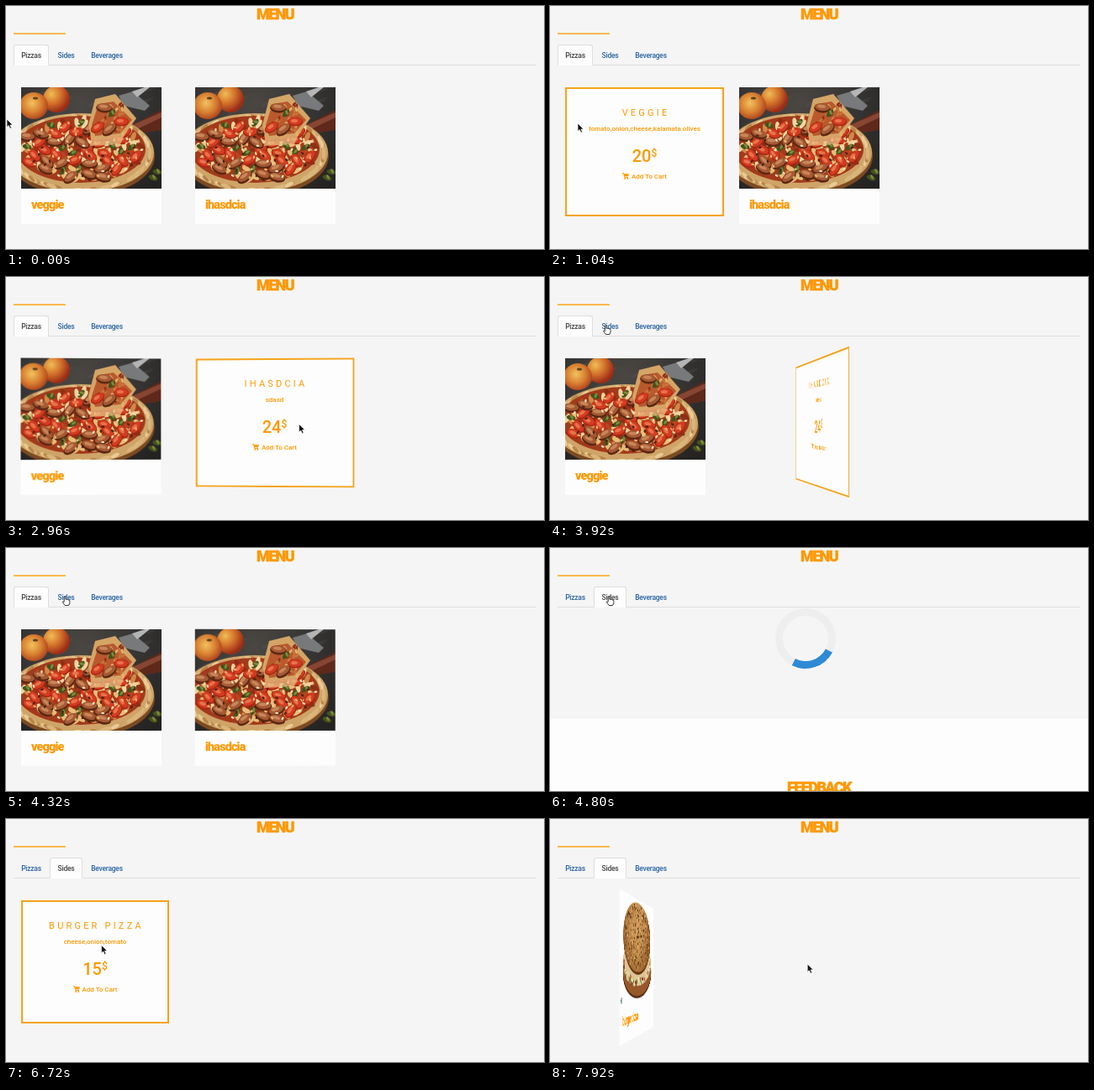
Write an HTML page with a canvas that moves like this. It is 640x290 px and loops after 8 s.

```html
<!DOCTYPE html>
<html lang="en">
<head>
<meta charset="utf-8">
<title>Menu</title>
<style>
html, body { margin: 0; width: 100%; height: 100%; overflow: hidden; }
#stage { position: relative; width: 640px; height: 290px; overflow: hidden; background: #fdfdfd; font: 500 8px/10px Roboto, sans-serif; color: #ff9800; }
#stage * { box-sizing: border-box; }
#stage > *, .face, .face > * { position: absolute; }
#panel { left: 0; top: 0; width: 640px; background: #f5f5f5; }
.brush { font-weight: 900; letter-spacing: -.9px; white-space: nowrap; }
h2 { margin: 0; width: 640px; text-align: center; font-size: 18px; line-height: 20px; }
h2.brush { letter-spacing: -1.6px; -webkit-text-stroke: .4px; }
#rule { left: 9px; top: 32px; width: 62px; height: 2px; background: #fbb750; }
#line { left: 9px; top: 70px; width: 622px; height: 1px; background: #ddd; }
.tab { top: 46px; height: 25px; padding: 7px 0; text-align: center; font-size: 8.5px; letter-spacing: -.25px; color: #2a64a3; border: 1px solid transparent; border-radius: 3px 3px 0 0; }
.tab.on { color: #444; background: #fdfdfd; border-color: #ddd #ddd #fdfdfd; }
.card { top: 97px; height: 164px; perspective: 600px; }
.flip { width: 100%; height: 100%; transform-style: preserve-3d; }
.face { left: 0; top: 0; backface-visibility: hidden; background: #fdfdfd; }
.face canvas { left: 0; top: 0; }
.name { left: 12px; font-size: 14.5px; line-height: 20px; }
.back { width: 100%; transform: rotateY(180deg); border: 2px solid #f5a31a; text-align: center; }
.back > * { left: 0; width: 100%; white-space: nowrap; }
.title { top: 22px; font: 400 11px/14px Roboto, sans-serif; letter-spacing: 3.2px; text-indent: 3px; }
.text { top: 43px; }
.price { top: 68px; font-size: 20px; line-height: 24px; }
.price sup { font-size: 12px; line-height: 0; vertical-align: 6px; }
.buy { top: 100px; }
.buy svg { width: 8px; height: 8px; margin-right: 3px; vertical-align: -1px; }
#spin { left: 268px; top: 71.5px; width: 72px; height: 72px; border: 9.6px solid #eee; border-top-color: #2f8ad6; border-radius: 50%; }
#arrow, #hand { left: 0; top: 0; overflow: visible; }
</style>
</head>
<body>
<div id="stage">
  <div id="panel"></div>
  <h2 class="brush" style="top:0">MENU</h2>
  <div id="rule"></div>
  <div id="line"></div>
  <div class="tab" style="left:9px;width:42px">Pizzas</div>
  <div class="tab" style="left:52px;width:39px">Sides</div>
  <div class="tab" style="left:92px;width:56px">Beverages</div>
  <div id="spin"></div>
  <h2 class="brush" id="feedback" style="top:276px">FEEDBACK</h2>
  <svg id="arrow" width="8" height="13"><path d="M0 0V9.6L2.2 7.6L3.8 11.2L5.5 10.4L4 7H7Z" fill="#111" stroke="#fff" stroke-width=".7"/></svg>
  <svg id="hand" width="10" height="13"><path d="M2.2 6.5V1Q3 -.4 3.9 1V4.3Q5 3.6 5.6 4.6Q6.8 4 7.3 5.2Q8.8 4.9 8.8 6.2V8.5L7.6 11.5H3.2L.2 7.6Q.2 6 2.2 7.4Z" fill="#fff" stroke="#222" stroke-width=".9"/></svg>
</div>
<script>
const $ = id => document.getElementById(id);
const LOOP = 8000, CLICK = 4480, LOADED = 5720, NAMED = 6060;

function seeded(seed) {
  return () => (seed = (seed * 16807) % 2147483647) / 2147483647;
}

function brush(c) {
  return {
    oval(x, y, rx, ry, color, turn = 0) {
      c.fillStyle = color;
      c.beginPath();
      c.ellipse(x, y, rx, ry, turn, 0, 7);
      c.fill();
    },
    poly(color, ...p) {
      c.fillStyle = color;
      c.beginPath();
      for (let i = 0; i < p.length; i += 2) c.lineTo(p[i], p[i + 1]);
      c.fill();
    },
    // light spot at x, y fading outwards
    glow(x, y, r, ...colors) {
      const g = c.createRadialGradient(x, y, 0, x, y, r);
      colors.forEach((color, i) => g.addColorStop(i / (colors.length - 1), color));
      return g;
    }
  };
}

function drawPizza(c) {
  const { oval, poly, glow } = brush(c), rnd = seeded(41);
  const pick = list => list[Math.floor(rnd() * list.length)];
  const leaf = (x, y) => {
    oval(x, y, 5.5, 3, '#46521c', rnd() * 3);
    oval(x + 1, y - 1, 3, 1.5, '#7d8a3c', rnd() * 3);
  };
  const tomato = (x, y) => {
    const a = rnd() * 2 - 1;
    oval(x, y, 9, 5.5, '#a82412', a);
    oval(x, y - .6, 8, 4.5, '#d23c20', a);
    oval(x - 1, y - 1, 4, 2, '#e8734c', a);
  };
  const sausage = (x, y) => {
    const a = rnd() * 2 - 1;
    oval(x, y + 1, 10, 5.5, '#5c2814', a);
    oval(x, y - .4, 9, 4.3, '#a55a34', a);
    oval(x - 1, y - 1.3, 5, 2, '#c98558', a);
  };
  c.fillStyle = glow(70, 20, 130, '#4a4743', '#383634', '#242322');
  c.fillRect(0, 0, 167, 121);
  for (let i = 0; i < 30; i++) oval(rnd() * 167, rnd() * 60, 9, 2, 'rgba(130,125,120,.1)', -.5);
  // apples
  oval(42, 14, 16, 16, glow(36, 8, 22, '#f0bd55', '#d4742c', '#9c2c17'));
  oval(15, 22, 17, 16, glow(13, 19, 22, '#f2c25e', '#d98232', '#a63419'));
  oval(17, 13, 3, 1.5, '#5f4218');
  // server and wooden handle
  poly('#77797a', 116, 10, 133, 5, 153, 22, 147, 28, 122, 22);
  poly('#b4b5b5', 132, 5, 147, 0, 153, 0, 138, 12);
  poly('#5e281b', 128, 47, 167, 27, 167, 51, 140, 55);
  poly('#874533', 130, 46, 167, 30, 167, 36, 138, 50);
  // base
  oval(71, 82, 88, 48, '#7b4a22');
  oval(71, 78, 87, 47, '#cfa468');
  for (let i = 0; i < 70; i++) {
    const a = rnd() * 6.3;
    oval(71 + 82 * Math.cos(a), 78 + 44 * Math.sin(a), 5, 2, pick(['#e8cb94', '#b98448', '#dab57a']), a + 1.6);
  }
  oval(71, 74, 77, 40, '#a23a1b');
  const scatter = (n, draw) => {
    for (let i = 0; i < n; i++) {
      const a = i * 2.4, r = Math.sqrt((i + .5) / n);
      draw(71 + 71 * r * Math.cos(a), 74 + 36 * r * Math.sin(a));
    }
  };
  scatter(130, (x, y) => oval(x + rnd() * 6, y, 6, 2.8, pick(['#e6bd78', '#d08a48', '#efd5a0', '#b8451f', '#8c2f16']), rnd() * 3));
  scatter(47, (x, y) => pick([sausage, tomato, tomato, leaf])(x, y));
  scatter(90, (x, y) => oval(x + rnd() * 8, y + rnd() * 4, 2, 1.2, pick(['#f4e0b4', '#e8b66c', '#4a2312']), rnd() * 3));
  // lifted slice
  poly('rgba(232,190,130,.75)', 84, 52, 126, 50, 118, 68, 82, 70);
  poly('#d5a566', 80, 45, 88, 14, 112, 8, 137, 37, 122, 58, 84, 62);
  poly('#b9592d', 84, 45, 92, 20, 110, 17, 132, 39, 118, 55, 88, 58);
  for (let i = 0; i < 40; i++) oval(90 + rnd() * 32, 20 + rnd() * 38, 3, 1.5, pick(['#e2b26a', '#c9743a', '#8f331a']), rnd() * 3);
  sausage(99, 24);
  tomato(119, 41);
  tomato(91, 48);
  leaf(108, 31);
  sausage(105, 50);
  leaf(157, 108);
  leaf(162, 101);
}

function drawBurger(c) {
  const { oval, poly, glow } = brush(c), rnd = seeded(7);
  const pick = list => list[Math.floor(rnd() * list.length)];
  c.fillStyle = '#fefefe';
  c.fillRect(0, 0, 173, 118);
  oval(86, 86, 73, 30.5, '#4f270e');
  oval(86, 84, 72, 30, '#97582a');
  oval(85, 74, 71, 28, '#dcc696');
  for (let i = 0; i < 80; i++) {
    const a = .1 + rnd() * 2.95;
    oval(85 + 68 * Math.cos(a), 70 + 24 * Math.sin(a) + rnd() * 7, 4, 2.2,
      pick(['#f2e8cc', '#e9d7a6', '#d2ad6a', '#8f3324', '#b77c42', '#77803c']), rnd());
  }
  oval(84, 47, 69, 42, '#643511');
  oval(84, 45, 69, 41, glow(78, 30, 72, '#d6a565', '#c48d4a', '#8d5422'));
  for (let i = 0; i < 750; i++) {
    const a = rnd() * 6.3, r = Math.sqrt(rnd());
    oval(84 + 67 * r * Math.cos(a), 45 + 39 * r * Math.sin(a), 2 * rnd() + .4, .9,
      pick(['#43260f', '#84542a', '#e2ba82', '#b57a3c']), rnd() * 3);
  }
  poly('#9aa89a', 3, 112, 10, 112, 10, 118, 3, 118);
  poly('#eef2ee', 4, 113, 9, 113, 9, 117, 4, 117);
  oval(6.5, 115, 1.6, 1.6, '#4d7a5a');
}

const CART = '<svg viewBox="0 0 8 8"><path d="M0 .5H1.5L2.8 5.5H7" fill="none" stroke="#ff9800"/><path d="M1.7 1.3H8L7 4.3H2.5Z" fill="#ff9800"/><circle cx="3.2" cy="7" r=".9" fill="#ff9800"/><circle cx="6.4" cy="7" r=".9" fill="#ff9800"/></svg>';

function card(o) {
  const el = document.createElement('div');
  el.className = 'card';
  el.style.cssText = `left:${o.x}px;width:${o.w}px`;
  el.innerHTML = `<div class="flip">
    <div class="face front" style="width:${o.iw}px;height:${o.h}px">
      <canvas width="${o.iw}" height="${o.ih}"></canvas>
      <div class="name brush" style="top:${o.ih + 10}px">${o.name}</div>
    </div>
    <div class="face back" style="height:${o.bh}px">
      <div class="title">${o.name.toUpperCase()}</div>
      <div class="text">${o.text}</div>
      <div class="price">${o.price}<sup>$</sup></div>
      <div class="buy">${CART}Add To Cart</div>
    </div></div>`;
  o.draw(el.querySelector('canvas').getContext('2d'));
  $('stage').insertBefore(el, $('arrow'));
  return { el, flip: el.firstChild, on: o.on, off: o.off };
}

const pizza = { w: 189, iw: 167, ih: 121, h: 163, bh: 154, draw: drawPizza };
const cards = [
  card({ ...pizza, x: 18, name: 'veggie', text: 'tomato,onion,cheese,kalamata olives', price: 20, on: 440, off: 2448 }),
  card({ ...pizza, x: 225, name: 'ihasdcia', text: 'sdasd', price: 24, on: 2455, off: 3775 }),
  card({ x: 18, w: 176, iw: 173, ih: 118, h: 161, bh: 147, draw: drawBurger, name: 'burger pizza', text: 'cheese,onion,tomato', price: 15, on: 6115, off: 7722 })
];
const burger = cards[2].el, burgerFront = burger.querySelector('.front'), burgerName = burger.querySelector('.name');
const tabs = document.querySelectorAll('.tab');

// CSS "ease" curve: cubic-bezier(.25, .1, .25, 1)
function ease(x) {
  if (x <= 0) return 0;
  if (x >= 1) return 1;
  const bez = (a, b, s) => 3 * a * s * (1 - s) ** 2 + 3 * b * s * s * (1 - s) + s ** 3;
  let lo = 0, hi = 1;
  for (let i = 0; i < 24; i++) {
    const mid = (lo + hi) / 2;
    if (bez(.25, .25, mid) < x) lo = mid; else hi = mid;
  }
  return bez(.1, 1, lo);
}

// pointer stops: time, x, y
const path = [
  [0, 1, 135], [80, 1, 135], [440, 18, 138], [800, 33, 140], [1240, 33, 140], [1280, 28, 140],
  [1400, 28, 140], [2200, 110, 152], [2400, 190, 166], [2455, 225, 169], [2560, 345, 175],
  [2720, 350, 177], [3560, 345, 172], [3775, 225, 120], [3900, 66, 57], [4200, 70, 57],
  [6040, 70, 57], [6115, 76, 97], [6500, 112, 150], [7400, 118, 152], [7722, 194, 164], [7920, 306, 173], [LOOP, 322, 175]
];

function pointer(t) {
  const i = path.findIndex(p => p[0] > t), a = path[i - 1], b = path[i];
  const k = (t - a[0]) / (b[0] - a[0]);
  return [a[1] + (b[1] - a[1]) * k, a[2] + (b[2] - a[2]) * k];
}

const show = (el, on) => { el.style.display = on ? '' : 'none'; };

function render(t) {
  const sides = t >= CLICK, loaded = t >= LOADED, named = t >= NAMED, waiting = sides && !loaded;
  $('panel').style.height = (waiting ? 204 : loaded && !named ? 275 : 290) + 'px';
  tabs[0].classList.toggle('on', !sides);
  tabs[1].classList.toggle('on', sides);
  show($('spin'), waiting);
  show($('feedback'), waiting);
  $('spin').style.transform = `rotate(${162 + (t - 4800) * .18}deg)`;
  cards.forEach((c, i) => {
    show(c.el, i < 2 ? !sides : loaded);
    const turn = 180 * (ease((t - c.on) / 600) - ease((t - c.off) / 600));
    c.flip.style.transform = `rotateY(${turn}deg)`;
  });
  show(burgerName, named);
  burgerFront.style.height = (named ? 161 : 118) + 'px';
  const [x, y] = pointer(t), hand = t > 3870 && t < 6070;
  show($('hand'), hand);
  show($('arrow'), !hand);
  $('arrow').style.transform = `translate(${x}px,${y}px)`;
  $('hand').style.transform = `translate(${x - 3}px,${y}px)`;
}

const start = performance.now();
function tick() {
  render((performance.now() - start) % LOOP);
  requestAnimationFrame(tick);
}
tick();
</script>
</body>
</html>
```
